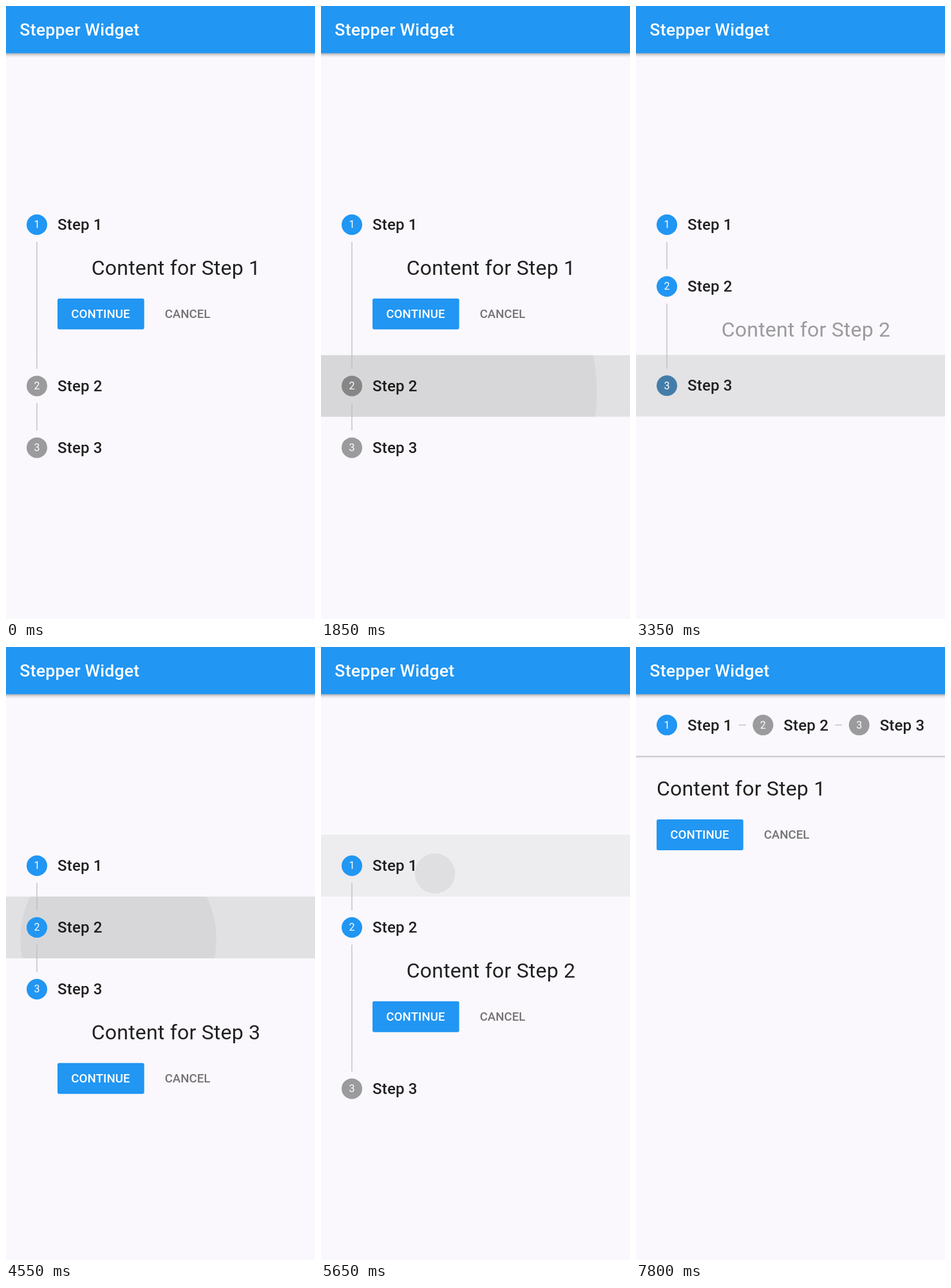
An HTML page that plays this animation: 480x953 px, repeating every 8 s.

```html
<!DOCTYPE html>
<html lang="en">
<head>
<meta charset="utf-8">
<title>Stepper</title>
<style>
  html, body { margin: 0; width: 100%; height: 100%; overflow: hidden; background: #faf8fc; }
  svg { display: block; font-family: Roboto, sans-serif; }
  .bar { fill: #2196f3; filter: drop-shadow(0 2.5px 2.5px rgba(0, 0, 0, .36)); }
  .strip { fill: #faf8fc; filter: drop-shadow(0 1.5px 1.5px rgba(0, 0, 0, .36)); }
  .title { font-size: 26.67px; font-weight: 500; letter-spacing: .2px; fill: #fff; }
  .step { font-size: 24px; font-weight: 500; letter-spacing: .2px; fill: rgba(0, 0, 0, .87); }
  .body { font-size: 32px; letter-spacing: .2px; fill: rgba(0, 0, 0, .87); }
  .num { font-size: 16px; fill: #fff; text-anchor: middle; }
  .button { font-size: 18.67px; font-weight: 500; }
  .line { fill: #bdbdbd; }
</style>
</head>
<body>
<svg id="stage" width="480" height="953"></svg>
<script>
const LOOP = 8000, FADE = 200, CUT = 7800;
const TOP = 292, ROW = 96, BODY = 154.67, BAR = 73.33;

// Each press: row, point inside the row, press and release times, step it opens
const taps = [
  { row: 1, x: 163, y: 56, down: 1026, up: 1860, step: 1 },
  { row: 2, x: 177, y: 47, down: 2380, up: 3270, step: 2 },
  { row: 1, x: 174.5, y: 66, down: 4064, up: 4850, step: 1 },
  { row: 0, x: 177, y: 60, down: 5550, up: 6380, step: 0 },
];

const stage = document.getElementById('stage');
const clamp = v => Math.min(1, Math.max(0, v));
const mix = (a, b, p) => a + (b - a) * p;

// cubic-bezier(.4, 0, .2, 1)
function ease(x) {
  let lo = 0, hi = 1;
  for (let i = 0; i < 20; i++) {
    const m = (lo + hi) / 2, n = 1 - m;
    if (1.2 * n * n * m + .6 * n * m * m + m ** 3 < x) lo = m; else hi = m;
  }
  return 3 * (1 - lo) * lo * lo + lo ** 3;
}

const text = (cls, x, mid, size, str, attrs = '') =>
  `<text class="${cls}" x="${x}" y="${mid + .3418 * size}" ${attrs}>${str}</text>`;

const rect = (x, y, w, h, attrs) =>
  `<rect x="${x}" y="${y}" width="${w}" height="${h}" ${attrs}/>`;

const vline = (y, h) => rect(47.33, y, 1.33, h, 'class="line"');

// on: 0 = grey, 1 = blue
function header(i, x, mid, on) {
  const fill = `rgba(${mix(0, 33, on)},${mix(0, 150, on)},${mix(0, 243, on)},${mix(.38, 1, on)})`;
  return `<circle cx="${x + 16}" cy="${mid}" r="16" fill="${fill}"/>` +
    text('num', x + 16, mid, 16, i + 1) +
    text('step', x + 48, mid, 24, `Step ${i + 1}`);
}

function content(i, x, centred) {
  return text('body', centred ? 264 : x, 18.7, 32, `Content for Step ${i + 1}`,
      centred ? 'text-anchor="middle"' : '') +
    rect(x, 66.67, 134.67, 48, 'rx="2.67" fill="#2196f3"') +
    text('button', x + 21.33, 90.67, 18.67, 'CONTINUE', 'fill="#fff" letter-spacing=".1"') +
    text('button', x + 166.67, 90.67, 18.67, 'CANCEL', 'fill="rgba(0,0,0,.54)"');
}

function ink(tap, t, y) {
  const age = t - tap.down, after = Math.max(0, t - tap.up);
  if (age < 0 || after >= FADE) return '';
  const alpha = .4 * (1 - after / FADE);
  const target = Math.hypot(480 - tap.x, Math.max(tap.y, ROW - tap.y));
  const r = target * clamp((age - after) / 1000 + after / target);
  return `<svg y="${y}" width="480" height="${ROW}">` +
    rect(0, 0, 480, ROW, `fill="#bcbcbc" opacity="${alpha * clamp(age / FADE)}"`) +
    `<circle cx="${tap.x}" cy="${tap.y}" r="${r}" fill="#c8c8c8" opacity="${alpha}"/></svg>`;
}

function vertical(t) {
  let from = 0, to = 0, p = 1;
  for (const tap of taps) {
    if (t >= tap.up) {
      from = to;
      to = tap.step;
      p = clamp((t - tap.up) / FADE);
    }
  }
  const e = ease(p);
  let out = '', y = TOP;
  for (let i = 0; i < 3; i++) {
    const v = i === to ? (from === to ? 1 : p) : i === from ? 1 - p : 0;
    const size = i === to ? (from === to ? 1 : e) : i === from ? 1 - e : 0;
    const h = BODY * size;
    for (const tap of taps) if (tap.row === i) out += ink(tap, t, y);
    if (i > 0) out += vline(y, 21.33);
    if (i < 2) out += vline(y + 74.67, 21.33 + h);
    out += header(i, 32, y + 48, mix(+(i <= from), +(i <= to), e));
    y += ROW;
    if (h > 0) {
      out += `<svg y="${y}" width="480" height="${h}"><g opacity="${ease(clamp((v - .4) / .6))}">` +
        content(i, 80, true) + '</g></svg>';
    }
    y += h;
  }
  return out;
}

function horizontal() {
  const mid = BAR + 48;
  let out = rect(-10, BAR, 500, ROW, 'class="strip"');
  for (let i = 0; i < 3; i++) {
    const x = 32 + i * 149.33;
    out += header(i, x, mid, +(i === 0));
    if (i < 2) out += rect(x + 128, mid - .67, 10.67, 1.33, 'class="line"');
  }
  return out + `<g transform="translate(0 201.33)">${content(0, 32, false)}</g>`;
}

function draw(now) {
  const t = now % LOOP;
  stage.innerHTML = (t < CUT ? vertical(t) : horizontal()) +
    rect(-10, -10, 500, BAR + 10, 'class="bar"') +
    text('title', 21.33, 36.67, 26.67, 'Stepper Widget');
  requestAnimationFrame(draw);
}
draw(performance.now());
</script>
</body>
</html>
```
